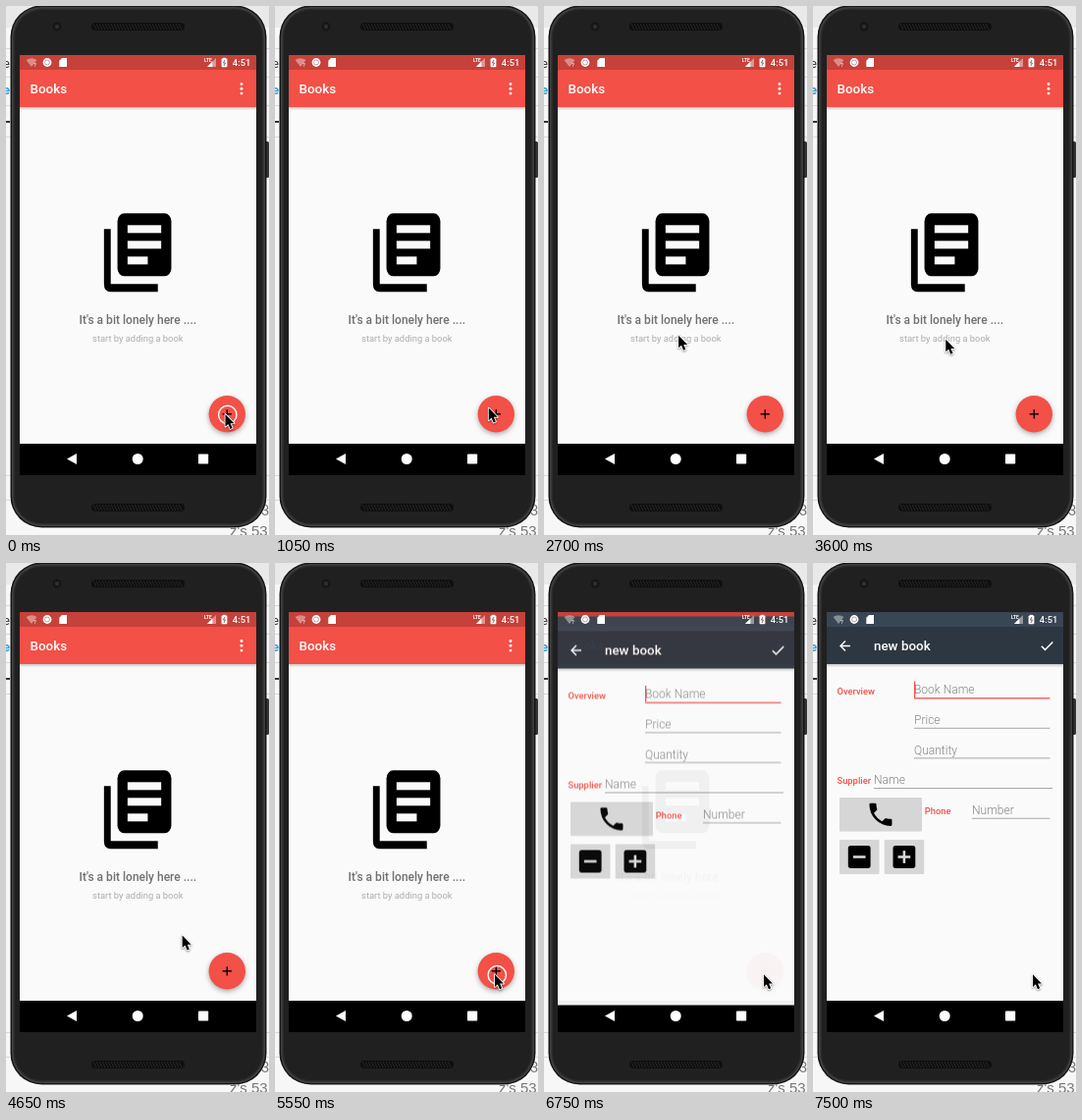
These frames come from a looping animation (268 by 539 pixels, 8 s). An HTML page with a canvas:

```html
<!DOCTYPE html>
<html lang="en">
<head>
<meta charset="utf-8">
<title>Book list</title>
<style>
html, body { margin: 0; width: 100%; height: 100%; overflow: hidden; background: #f3f3f3; }
canvas { display: block; width: 268px; height: 539px; }
</style>
</head>
<body>
<canvas id="stage"></canvas>
<script>
const W = 268, H = 539, LOOP = 8000, STEP = 150;
const RED = '#f35047', DARK_RED = '#c5413a', NAVY = '#2d3741', SLATE = '#394653';
const PAPER = '#fafafa', BUTTON = '#d6d6d6', WHITE = '#fff', BLACK = '#000';
const LEFT = 14, TOP = 50, WIDTH = 241, NAV = 446;
const DP = 0.669;
const dpr = window.devicePixelRatio || 1;

// Pointer key points: time, x, y
const PATH = [
  [900, 223.5, 416], [1800, 146, 329.5], [2050, 117, 338], [2500, 148, 332],
  [2950, 122, 341], [3400, 141, 341], [3600, 135.3, 339.7], [4050, 135.3, 339.7], [5250, 224, 419.3]
];

function layer(el) {
  el.width = Math.round(W * dpr);
  el.height = Math.round(H * dpr);
  const c = el.getContext('2d');
  c.scale(dpr, dpr);
  return c;
}

function rect(c, x, y, w, h, fill) {
  c.fillStyle = fill;
  c.fillRect(x, y, w, h);
}

function round(c, x, y, w, h, r, fill) {
  c.fillStyle = fill;
  c.beginPath();
  c.roundRect(x, y, w, h, r);
  c.fill();
}

function disc(c, x, y, r, fill) {
  c.fillStyle = fill;
  c.beginPath();
  c.arc(x, y, r, 0, Math.PI * 2);
  c.fill();
}

function ring(c, x, y, r, width, color) {
  c.strokeStyle = color;
  c.lineWidth = width;
  c.beginPath();
  c.arc(x, y, r, 0, Math.PI * 2);
  c.stroke();
}

function shape(c, d, fill) {
  c.fillStyle = fill;
  c.fill(new Path2D(d));
}

function line(c, d, width, color) {
  c.strokeStyle = color;
  c.lineWidth = width;
  c.stroke(new Path2D(d));
}

function text(c, str, x, y, size, weight, fill, align = 'left') {
  c.font = `${weight} ${size}px Roboto, sans-serif`;
  c.textAlign = align;
  c.fillStyle = fill;
  c.fillText(str, x, y);
}

// Runs paint with the origin at x, y and the given scale
function at(c, x, y, sx, sy, paint) {
  c.save();
  c.translate(x, y);
  c.scale(sx, sy);
  paint();
  c.restore();
}

function cross(c, x, y, size, width, fill, upright = true) {
  rect(c, x - size / 2, y - width / 2, size, width, fill);
  if (upright) rect(c, x - width / 2, y - size / 2, width, size, fill);
}

function bars(c, status, bar) {
  rect(c, LEFT, TOP, WIDTH, NAV - TOP, PAPER);
  const g = c.createLinearGradient(0, 103, 0, 106.5);
  g.addColorStop(0, 'rgba(0,0,0,.2)');
  g.addColorStop(1, 'rgba(0,0,0,0)');
  rect(c, LEFT, 103, WIDTH, 3.5, g);
  rect(c, LEFT, 65, WIDTH, 38, bar);
  rect(c, LEFT, TOP, WIDTH, 15, status);
}

function title(c, str, x) {
  text(c, str, x, 89.2, 20 * DP, 500, WHITE);
}

function speaker(c, y) {
  round(c, 87, y, 95, 8, 4, '#0f0f0f');
  for (let i = 0; i < 90; i++)
    rect(c, 89 + i, y + 1.5 + (i % 3) * 2, 1.2, 1.2, '#303030');
}

function paintDesk(c) {
  rect(c, 0, 0, W, H, '#f7f7f7');
  rect(c, 0, 0, W, 22, '#e9e9e9');
  for (const y of [43, 72, 101, 133, 478, 503]) rect(c, 0, y, W, 1, '#d9d9d9');
  text(c, 'e', -3, 63, 13, 400, '#333');
  text(c, 'e', -3, 90, 13, 700, '#2d9fd8');
  rect(c, 0, 117, 4, 2, '#333');
  text(c, '3', 260, 519, 15, 400, '#777');
  c.font = '15px "Liberation Sans", sans-serif';
  c.fillText("z's 53", 228, 540);
}

function paintPhone(c) {
  round(c, 262, 138, 6, 37, 1.5, '#333');
  ['#151515', '#404040', '#2b2b2b', '#202020'].forEach((fill, i) => {
    const d = i * 1.5;
    round(c, 4.5 + d, d - 0.5, 261 - 2 * d, 532 - 2 * d, 32 - d, fill);
  });
  disc(c, 52, 21, 4.5, '#161616');
  disc(c, 52, 21, 2.2, '#2b2e33');
  speaker(c, 17);
  speaker(c, 507);
  rect(c, LEFT, NAV, WIDTH, 478 - NAV, BLACK);
}

function paintBooksIcon(c) {
  line(c, 'M3 6V20Q3 21 4 21H18', 2, BLACK);
  round(c, 6, 2, 16, 16, 2, BLACK);
  for (let i = 0; i < 3; i++) rect(c, 9, 5 + 4 * i, i < 2 ? 10 : 6, 2, PAPER);
}

function paintList(c) {
  bars(c, DARK_RED, RED);
  title(c, 'Books', 24.5);
  for (let i = -1; i < 2; i++) disc(c, 240, 84.3 + 4.8 * i, 1.45, WHITE);
  at(c, 93, 203.3, 3.43, 4, () => paintBooksIcon(c));
  text(c, "It's a bit lonely here ....", 134.3, 323.6, 18 * DP, 500, '#707070', 'center');
  text(c, 'start by adding a book', 134.3, 342.2, 14 * DP, 400, '#adadad', 'center');
  c.save();
  c.shadowColor = 'rgba(0,0,0,.32)';
  c.shadowBlur = 5 * dpr;
  c.shadowOffsetY = 2 * dpr;
  disc(c, 225.3, 415.8, 28 * DP, RED);
  c.restore();
  cross(c, 225.3, 415.8, 14 * DP, 2 * DP, BLACK);
}

// Baseline of a form row
const row = i => 133.4 + 30.65 * i;

function field(c, hint, x, i, right = 241.5) {
  text(c, hint, x, row(i), 18 * DP, 300, '#858585');
  rect(c, x, row(i) + 3.8, right - x, i ? 0.8 : 1.3, i ? '#929292' : RED);
}

function label(c, str, x, y) {
  text(c, str, x, y, 14 * DP, 500, RED);
}

function stepper(c, x, upright) {
  round(c, x, 282, 40.5, 35, 1, BUTTON);
  const cx = x + 20.2, cy = 299.5;
  round(c, cx - 11.4, cy - 11.4, 22.8, 22.8, 2.6, BLACK);
  cross(c, cx, cy, 12.7, 2.6, BUTTON, upright);
}

function paintForm(c) {
  bars(c, SLATE, NAVY);
  line(c, 'M38 84.5H28.8M33 79.5L28 84.5L33 89.5', 1.4, WHITE);
  title(c, 'new book', 62);
  line(c, 'M232.8 84.8L236.5 88.4L244.3 80.4', 1.5, WHITE);
  label(c, 'Overview', 24.5, row(0) + 0.9);
  label(c, 'Supplier', 24.5, row(3) - 0.1);
  label(c, 'Phone', 113.8, row(4));
  ['Book Name', 'Price', 'Quantity'].forEach((hint, i) => field(c, hint, 103, i));
  field(c, 'Name', 62, 3, 244);
  field(c, 'Number', 162, 4);
  round(c, 27, 239, 84, 34.5, 1, BUTTON);
  at(c, 53.6, 241, 1.28, 1.28, () => shape(c, 'M6.6 10.8Q8.8 15.2 13.2 17.4L15.4 15.2Q15.9 14.8 16.4 15Q18 15.5 20 15.5Q21 15.5 21 16.5V20Q21 21 20 21A17 17 0 0 1 3 4Q3 3 4 3H7.5Q8.5 3 8.5 4Q8.5 6 9.1 7.6Q9.2 8.2 8.8 8.6Z', BLACK));
  stepper(c, 27, false);
  stepper(c, 72.7, true);
}

function paintSystem(c) {
  shape(c, 'M20.5 55Q26 51.5 31.5 55L26 62Z', 'rgba(255,255,255,.4)');
  text(c, '?', 28, 62, 6, 700, 'rgba(255,255,255,.75)');
  disc(c, 42, 57.5, 4.4, WHITE);
  ring(c, 42, 57.5, 2.5, 1, 'rgba(110,60,60,.45)');
  shape(c, 'M57 53H62V62H54.3V55.7Z', WHITE);
  text(c, 'LTE', 202, 56.8, 4.8, 700, WHITE);
  shape(c, 'M214 53V62H205Z', 'rgba(255,255,255,.45)');
  shape(c, 'M210.4 56.6V62H205Z', WHITE);
  rect(c, 221, 52.8, 3, 1.2, WHITE);
  round(c, 219.6, 53.6, 5.8, 8.6, 0.7, WHITE);
  line(c, 'M223 55L221.5 58H223.5L222 61', 0.9, 'rgba(90,40,40,.8)');
  text(c, '4:51', 249.3, 61, 14 * DP, 500, WHITE, 'right');
  shape(c, 'M62 461.5L72 456V467Z', WHITE);
  disc(c, 134.2, 461.5, 5.5, WHITE);
  round(c, 196, 456.5, 10.2, 10, 0.8, WHITE);
}

function paintPointer(c, x, y) {
  const arrow = 'M0 0V14L3.2 11.1L5.5 16.6L8 15.5L5.7 10.2H10Z';
  at(c, x, y, 0.9, 0.9, () => {
    c.lineJoin = 'round';
    c.shadowColor = 'rgba(0,0,0,.4)';
    c.shadowBlur = 2 * dpr;
    c.shadowOffsetY = dpr;
    line(c, arrow, 2, WHITE);
    c.shadowColor = 'transparent';
    shape(c, arrow, BLACK);
  });
}

function prerender(...painters) {
  const el = document.createElement('canvas');
  const c = layer(el);
  painters.forEach(p => p(c));
  return el;
}

const ctx = layer(document.getElementById('stage'));
const base = prerender(paintDesk, paintPhone, paintList);
const form = prerender(paintForm);
const system = prerender(paintSystem);

const clamp = v => Math.min(1, Math.max(0, v));
const smooth = u => u * u * (3 - 2 * u);

function pointerAt(t) {
  let [, x, y] = PATH[0];
  for (let i = 1; i < PATH.length; i++) {
    const [t0] = PATH[i - 1], [t1, px, py] = PATH[i];
    const k = smooth(clamp((t - t0) / (t1 - t0)));
    x += (px - x) * k;
    y += (py - y) * k;
  }
  return [x, y];
}

// The form fades in and rises with decelerating curves
const OPEN = 6576, RISE = 520, FADE = 315;
const left = (t, span, power) => Math.pow(1 - clamp((t - OPEN) / span), power);

function click(t, x, y, from, span) {
  if (t < from || t >= from + span) return;
  ctx.globalAlpha = 1 - (t - from) / span;
  ring(ctx, x + 2.3, y + 0.4, 9.2, 1.4, WHITE);
  ctx.globalAlpha = 1;
}

function draw(now) {
  const t = Math.floor((now % LOOP) / STEP) * STEP;
  ctx.drawImage(base, 0, 0, W, H);
  if (t > OPEN) {
    ctx.save();
    ctx.beginPath();
    ctx.rect(LEFT, TOP, WIDTH, 428);
    ctx.clip();
    ctx.globalAlpha = 1 - left(t, FADE, 4);
    ctx.translate(0, 34.2 * left(t, RISE, 5));
    ctx.drawImage(form, 0, 0, W, H);
    if (t < 7050 || t >= 7500) rect(ctx, 103, 120.5, 1.3, 16.5, RED);
    ctx.restore();
  }
  ctx.drawImage(system, 0, 0, W, H);
  const [x, y] = pointerAt(t);
  click(t, x, y, 0, 150);
  click(t, x, y, 5550, 450);
  paintPointer(ctx, x, y);
}

const start = performance.now();
function tick() {
  draw(performance.now() - start);
  requestAnimationFrame(tick);
}
tick();
</script>
</body>
</html>
```
